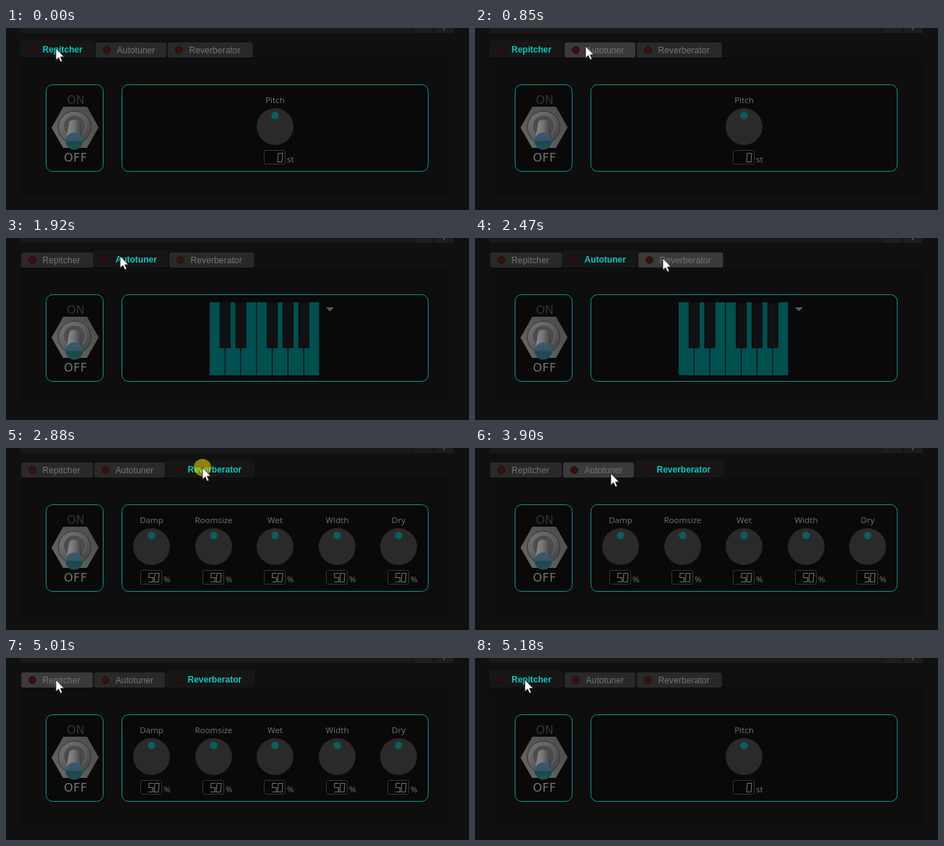
An HTML page that plays this animation: 641 px wide and 252 px high, repeating every 6220 ms.

```html
<!DOCTYPE html>
<html lang="en">
<head>
<meta charset="utf-8">
<title>Effect tabs</title>
<style>
html, body { margin: 0; width: 100%; height: 100%; overflow: hidden; background: #101010; }
svg { display: block; }
.tab text { font: 12px "Liberation Sans", Arial, sans-serif; fill: #757575; letter-spacing: .1px; }
.tab rect { fill: #292929; }
.tab.hover rect { fill: #3a3a3a; }
.tab.on text { font-weight: bold; fill: #0cc6c0; letter-spacing: 0; }
.tab.on rect { fill: #161616; }
.tab circle { fill: #3a0f0c; stroke: #210b0a; }
.tab.on circle { fill: #2c0f0d; stroke: #1c0d0c; }
.label { font: 11.5px "Noto Sans", "Open Sans", sans-serif; fill: #6c6c6c; }
.switch { font: 16px "DejaVu Sans", sans-serif; text-anchor: middle; }
.frame { fill: #090909; stroke: #0b9492; }
.digit { fill: none; stroke: #707070; stroke-width: 1.1; }
</style>
</head>
<body>
<svg id="stage" width="641" height="252" viewBox="0 0 641 252">
  <defs>
    <linearGradient id="nut" x1="0" y1="1" x2="1" y2="0">
      <stop offset="0" stop-color="#6b6b6b"/><stop offset=".5" stop-color="#585858"/><stop offset="1" stop-color="#4a4a4a"/>
    </linearGradient>
    <linearGradient id="ring" x1="0" y1="0" x2="1" y2="1">
      <stop offset="0" stop-color="#777"/><stop offset="1" stop-color="#404040"/>
    </linearGradient>
    <linearGradient id="lever">
      <stop offset="0" stop-color="#8b8b8b"/><stop offset=".45" stop-color="#777"/><stop offset="1" stop-color="#383838"/>
    </linearGradient>
    <linearGradient id="ball" x2="0" y2="1">
      <stop offset="0" stop-color="#40566a"/><stop offset=".45" stop-color="#34566a"/>
      <stop offset=".55" stop-color="#1d474b"/><stop offset="1" stop-color="#1f4f52"/>
    </linearGradient>
  </defs>

  <path d="M20 0H563V7H20z" fill="#191919"/>
  <path d="M564 0H591V7H564zM593 0H620V7H593z" fill="#1d1d1d"/>
  <path d="M606.5 0V3" stroke="#5c8080"/>
  <path d="M20 41H615Q620 41 620 46V228Q620 233 615 233H25Q20 233 20 228z" fill="#0e0e0e"/>
  <path d="M20 41.5H616" stroke="#090909"/>

  <g id="tabs"></g>

  <rect class="frame" x="55.5" y="78.5" width="79" height="120" rx="9"/>
  <rect class="frame" x="160.5" y="78.5" width="424" height="120" rx="9"/>

  <g class="switch">
    <text x="96.500" y="105" fill="#343434">ON</text>
    <text x="96.500" y="185" fill="#757575" letter-spacing=".5">OFF</text>
  </g>
  <path d="M63 138L79 109.500H112L128 138L112 166H79z" fill="url(#nut)"/>
  <path d="M79 109.500H112L128 138" fill="none" stroke="#6c6c6c" opacity=".6"/>
  <circle cx="95" cy="137.500" r="22.500" fill="url(#ring)" stroke="#303030"/>
  <circle cx="95" cy="136" r="15.500" fill="#4c4c4c" stroke="#707070"/>
  <path d="M87 134Q87 127 94 127Q103 127 104 135L106 156H83z" fill="url(#lever)"/>
  <circle cx="94.500" cy="156.500" r="12" fill="url(#ball)"/>

  <g id="pages"></g>
  <circle id="click" r="12" fill="#fff000" fill-opacity=".5"/>
  <path id="cursor" d="M0 0V16.500L3.800 13L6.500 19L9 18L6.500 12H11.500z" fill="#fff" stroke="#111" stroke-width=".8"/>
</svg>
<script>
const LOOP = 6220;
const $ = id => document.getElementById(id);
const names = ["Repitcher", "Autotuner", "Reverberator"];
const tabWidths = [99.5, 98, 117.5], activeWidths = [102, 103, 123];
const tabStarts = [[20, 124, 224], [21, 121, 226], [21, 122, 221]];
// [press, release, tab]
const clicks = [[1010, 1150, 1], [2880, 3020, 2], [5080, 5180, 0]];
// [time, x, y] of the pointer tip
const path = [
  [0, 69, 28], [540, 69, 28], [850, 153, 25], [1000, 157, 25], [1910, 157, 25],
  [1920, 158, 25], [1980, 158, 25], [2260, 217, 30], [2540, 265, 28], [2580, 265, 28],
  [2740, 272, 27], [3450, 272, 27], [3900, 188, 35], [4070, 136, 36.5],
  [4500, 67, 30], [4860, 67, 30], [4870, 69, 30], [LOOP, 69, 30]
];

// Seven-segment shapes on a 6 x 12 cell
const digits = { 0: "M0 0H6V12H0z", 5: "M6 0H0V6H6V12H0" };
const digit = (d, x) => `<path class="digit" d="${digits[d]}" transform="translate(${x} 173.500) skewX(-4)"/>`;

function knob(cx, label, value, unit) {
  const shown = [...value].reverse().map((d, i) => digit(d, cx + 4.5 - 8 * i)).join("");
  return `<text class="label" x="${cx}" y="104" text-anchor="middle">${label}</text>
    <circle cx="${cx}" cy="136.500" r="25.500" fill="#2a2a2a"/>
    <circle cx="${cx}" cy="121" r="5.200" fill="#07605d"/>
    <rect x="${cx - 15}" y="169.500" width="29" height="19" rx="2" fill="#060606" stroke="#363636"/>
    ${shown}<text class="label" x="${cx + 16.5}" y="186">${unit}</text>`;
}

function piano() {
  const step = 21.8;
  let keys = "";
  for (let i = 0; i < 7; i++)
    keys += `<rect x="${282 + i * step}" y="89" width="20.600" height="101" fill="#00504f"/>`;
  for (const i of [1, 2, 4, 5, 6])
    keys += `<rect x="${274.5 + i * step}" y="89" width="14" height="63" fill="#111" stroke="#080808"/>`;
  return keys + `<path d="M443 96H454L448.500 101.500z" fill="#4b6060"/>`;
}

const reverb = ["Damp", "Roomsize", "Wet", "Width", "Dry"]
  .map((label, i) => knob(201.5 + Math.round(i * 85.6), label, "50", "%")).join("");
$("pages").innerHTML = [knob(372.5, "Pitch", "0", "st"), piano(), reverb]
  .map(page => `<g>${page}</g>`).join("");
$("tabs").innerHTML = names.map(name =>
  `<g><rect rx="3"/><circle cy="30" r="4.800"/><text y="35">${name}</text></g>`).join("");
const pages = [...$("pages").children], tabs = [...$("tabs").children];

// Slope at a waypoint; zero beside a rest
function slope(i, k) {
  const a = path[i - 1], b = path[i], c = path[i + 1];
  if (!a || !c || a[1] === b[1] || b[1] === c[1]) return 0;
  return (c[k] - a[k]) / (c[0] - a[0]);
}

function pointer(t) {
  const i = path.findIndex(p => p[0] > t) - 1;
  const a = path[i], b = path[i + 1], d = b[0] - a[0], u = (t - a[0]) / d;
  return [1, 2].map(k => {
    const ease = u * u * (3 - 2 * u);
    return a[k] + (b[k] - a[k]) * ease
      + d * u * (1 - u) * ((1 - u) * slope(i, k) - u * slope(i + 1, k));
  });
}

function layoutTabs(active, x, y) {
  tabs.forEach((tab, i) => {
    const on = i === active, left = tabStarts[active][i];
    const top = on ? 17 : 20, width = (on ? activeWidths : tabWidths)[i];
    const over = !on && x >= left && x < left + width && y >= top && y < 41;
    const [box, dot, text] = tab.children;
    tab.setAttribute("class", "tab" + (on ? " on" : over ? " hover" : ""));
    box.setAttribute("x", left);
    box.setAttribute("y", top);
    box.setAttribute("width", width);
    box.setAttribute("height", 41 - top);
    dot.setAttribute("cx", left + 15.5);
    dot.setAttribute("cy", on ? 29.5 : 30.5);
    text.setAttribute("x", left + (on ? 30.5 : 29.5));
    text.setAttribute("y", on ? 34 : 35);
  });
}

function draw() {
  const t = performance.now() % LOOP;
  const [x, y] = pointer(t).map(Math.round);
  const last = clicks.filter(c => t >= c[0]).pop();
  const active = last ? last[2] : 0;
  layoutTabs(active, x, y);
  pages.forEach((page, i) => page.style.display = i === active ? "" : "none");
  const place = `translate(${x} ${y})`;
  $("cursor").setAttribute("transform", place);
  $("click").setAttribute("transform", place);
  $("click").style.display = last && t < last[1] ? "" : "none";
  requestAnimationFrame(draw);
}
draw();
</script>
</body>
</html>
```
